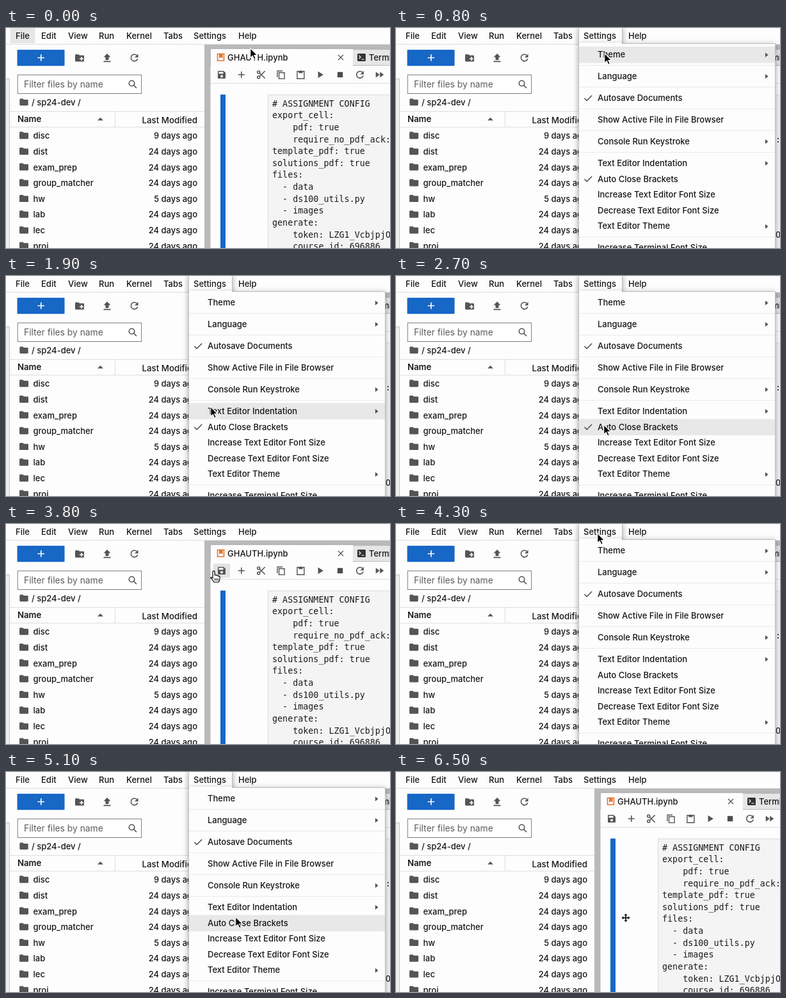
An HTML page for the animation above (6600 ms loop, 600 px wide and 344 px high).

```html
<!DOCTYPE html>
<html lang="en">
<head>
<meta charset="utf-8">
<title>Editor settings menu</title>
<style>
  html, body { margin: 0; width: 100%; height: 100%; overflow: hidden; background: #fdfdfd; }
  svg { display: block; width: 100vw; height: 100vh; }
  text { font: 500 13px Inter, "Liberation Sans", sans-serif; fill: #161616; white-space: pre; }
  .code text { font: 13.37px "DejaVu Sans Mono", monospace; fill: #1c1c1c; }
  .icon { fill: #555; stroke: none; }
  .line { fill: none; stroke: #555; stroke-width: 1.6; }
</style>
</head>
<body>
<svg viewBox="0 0 600 344" preserveAspectRatio="none">
  <defs>
    <filter id="shadow" x="-10%" y="-10%" width="120%" height="120%">
      <feDropShadow dx="0" dy="2" stdDeviation="5" flood-opacity=".36"/>
    </filter>
  </defs>
  <g id="app"></g>
  <g id="bar"></g>
  <g id="menu"></g>
  <g id="pointer"></g>
</svg>
<script>
const LOOP = 6600, STEP = 100;
const BLUE = '#1767c6', GRAY = '#b9b9b9', RULE = '#dedede', HOVER = '#e8e8e8';
const get = id => document.getElementById(id);

const rect = (x, y, w, h, fill, extra = '') =>
  `<rect x="${x}" y="${y}" width="${w}" height="${h}" fill="${fill}" ${extra}/>`;
// y is the vertical centre of the capitals
const text = (x, y, s, extra = '') => `<text x="${x}" y="${y + 4.7}" ${extra}>${s}</text>`;
const path = (d, cls = 'icon', extra = '') => `<path class="${cls}" d="${d}" ${extra}/>`;
const at = (x, y, body, scale = 1) => `<g transform="translate(${x} ${y}) scale(${scale})">${body}</g>`;

const FOLDER = 'M-7 -4.5q0-1.2 1.2-1.2h4.2l1.5 1.5h5.8q1.3 0 1.3 1.3v7.2q0 1.2-1.3 1.2h-11.5q-1.2 0-1.2-1.2z';
const icons = {
  folder: path(FOLDER),
  newFolder: path(FOLDER) + path('M3 -2v6M0 1h6', 'line', 'style="stroke:#fff"'),
  upload: path('M0 -7l5.5 5.5h-3v4.5h-5v-4.5h-3zM-5.5 4.6h11v1.7h-11z'),
  refresh: path('M3.8 -3.8A5.3 5.3 0 1 0 5.2 1.5', 'line') + path('M6 -6v5.5h-5.5z'),
  search: '<circle class="line" cx="-1.5" cy="-1.5" r="4.2"/>' + path('M1.6 1.6l4.4 4.4', 'line', 'stroke-width="2"'),
  save: path('M-6 -5q0-1 1-1h8l3 3v8q0 1-1 1h-10q-1 0-1-1z')
    + rect(-4.5, -4.5, 7, 3, '#fff') + '<circle cy="2.6" r="2" fill="#fff"/>',
  add: path('M0 -5v10M-5 0h10', 'line'),
  cut: '<circle class="line" cx="-4" cy="-4" r="2"/><circle class="line" cx="-4" cy="4" r="2"/>'
    + path('M-2.6 -2.8L6 5.8M-2.6 2.8L6 -5.8', 'line', 'stroke-width="2"'),
  copy: path('M-5.5 4v-9.7h8', 'line', 'style="stroke-width:1.4"')
    + path('M-3 -3.2h8.5v9.6h-8.5z', 'line', 'style="stroke-width:1.4"'),
  paste: path('M-5.5 -5.2h11v11.4h-11z', 'line', 'style="stroke-width:1.4"') + path('M-3.2 -5.5h2q1.2-2.6 2.4 0h2v3h-6.4z'),
  run: path('M-3.7 -5.2L4.7 0L-3.7 5.2z'),
  stop: rect(-4.2, -4.2, 8.4, 8.4, '#4c4c4c'),
  forward: path('M-6 -4.5L0 0L-6 4.5zM0.5 -4.5L6.5 0L0.5 4.5z'),
};

function fileBrowser() {
  const files = ['disc', 'dist', 'exam_prep', 'group_matcher', 'hw', 'lab', 'lec', 'proj'];
  const ages = { disc: 9, hw: 5 };
  return rect(-1, 79.5, 6.5, 270, '#eeeeee', 'stroke="#c4c4c4"')
    + rect(17.5, 34, 74, 25.3, BLUE, 'rx="1"') + path('M54.8 41.3v10.4M49.6 46.5h10.4', 'line', 'style="stroke:#fff"')
    + at(115, 47, icons.newFolder) + at(158, 47, icons.upload) + at(200.5, 46.5, icons.refresh)
    + rect(18.2, 73.3, 193.4, 29.2, '#fff', 'stroke="#7c7c7c"')
    + text(28, 88, 'Filter files by name', 'style="font-size:13.85px;font-weight:400;fill:#5c5c5c"')
    + at(198, 88, icons.search)
    + at(28, 116, icons.folder, .95) + text(40, 116, '/ sp24-dev /')
    + rect(6, 130, 304, 1, RULE) + rect(6, 154.5, 304, 1, RULE) + rect(170, 131, 1, 23, RULE)
    + text(18, 142.5, 'Name', 'style="font-size:13.2px;font-weight:600"') + path('M143 144.5l4.5-4.5l4.5 4.5z')
    + text(299, 144, 'Last Modified', 'text-anchor="end" style="font-size:13.3px"')
    + files.map((name, i) => {
      const y = 168.5 + i * 24.65;
      return at(28, y - .5, icons.folder) + text(42.5, y, name)
        + text(299, y, `${ages[name] || 24} days ago`, 'text-anchor="end"');
    }).join('');
}

function notebook() {
  const code = ['# ASSIGNMENT CONFIG', 'export_cell:', '    pdf: true', '    require_no_pdf_ack: true',
    'template_pdf: true', 'solutions_pdf: true', 'files:', '  - data', '  - ds100_utils.py',
    '  - images', 'generate:', '    token: LZG1_VcbjpjO', '    course_id: 696886'];
  const tools = ['save', 'add', 'cut', 'copy', 'paste', 'run', 'stop', 'refresh', 'forward'];
  return rect(310, 25, 290, 319, GRAY) + rect(319.5, 59, 281, 285, '#fdfdfd')
    + rect(320, 33, 222, 26, '#fdfdfd') + rect(542, 34, 58, 24, '#e6e6e6') + rect(542, 58, 58, 1, GRAY)
    + path('M330.5 40.5h10v10.5h-10z', 'line', 'style="stroke:#e8722c"')
    + path('M333 41h5.5v7l-2.75-2.4l-2.75 2.4z', 'icon', 'style="fill:#e8722c"')
    + text(346, 46, 'GHAUTH.ipynb') + path('M519 42l8 8M527 42l-8 8', 'line', 'style="stroke-width:1.2"')
    + rect(549, 40, 13, 12, '#333', 'rx="1.5"')
    + path('M551.5 43l2.5 2.5l-2.5 2.5M555.5 49h4', 'line', 'style="stroke:#fff;stroke-width:1.2"')
    + text(567, 46, 'Terminal 1')
    + '<rect id="saveHover" x="324" y="62" width="26" height="22" fill="#e2e2e2"/>'
    + tools.map((t, i) => at(337 + i * 30.85, 73, icons[t])).join('')
    + rect(320, 86, 280, 1, RULE)
    + rect(335, 104, 8, 240, BLUE, 'rx="1"')
    + rect(409.5, 104.5, 200, 250, '#f4f4f4', 'stroke="#dcdcdc"')
    + `<g class="code">${code.map((s, i) => text(416, 118 + i * 18.62, s)).join('')}</g>`;
}

const titles = [['File', 15], ['Edit', 55], ['View', 97], ['Run', 145], ['Kernel', 188],
  ['Tabs', 246], ['Settings', 293], ['Help', 363]];
const titleEdge = i => i < titles.length ? titles[i][1] - 8.5 : 401;

function menuBar(active, open) {
  let mark = '';
  if (open) mark = rect(285.5, -1, 68, 26, '#fdfdfd', 'stroke="#c2c2c2" filter="url(#shadow)"');
  else if (active >= 0) mark = rect(titleEdge(active), 0, titleEdge(active + 1) - titleEdge(active) - 1, 24, '#e6e6e6');
  return rect(0, 0, 600, 25, '#fdfdfd') + rect(0, 25, 600, 1, RULE) + mark
    + titles.map(([s, x]) => text(x, 12.5, s)).join('');
}

// label, centre, marker: '>' opens a submenu, 'v' is ticked
const rows = [['Theme', 41.5, '>'], ['Language', 75, '>'], ['Autosave Documents', 109.5, 'v'],
  ['Show Active File in File Browser', 143, ''], ['Console Run Keystroke', 177, '>'],
  ['Text Editor Indentation', 211, '>'], ['Auto Close Brackets', 236, 'auto'],
  ['Increase Text Editor Font Size', 260.3, ''], ['Decrease Text Editor Font Size', 285, ''],
  ['Text Editor Theme', 309.7, '>'], ['Increase Terminal Font Size', 343, '']];

function settingsMenu(pointerY, autoClose) {
  const near = rows.reduce((a, b) => Math.abs(b[1] - pointerY) < Math.abs(a[1] - pointerY) ? b : a);
  const hover = Math.abs(near[1] - pointerY) < 15 ? near : null;
  return rect(285.5, 24.5, 307, 340, '#fdfdfd', 'stroke="#c2c2c2" filter="url(#shadow)"')
    + rect(286, 23, 67, 3, '#fdfdfd')
    + [58, 92, 126, 160, 194, 326].map(y => rect(286, y, 306, 1, '#ebebeb')).join('')
    + (hover ? rect(286, hover[1] - 12.5, 306, 25.7, HOVER) : '')
    + rows.map(([label, y, kind]) => {
      const ticked = kind === 'v' || kind === 'auto' && autoClose;
      return text(315, y, label)
        + (kind === '>' ? path(`M577 ${y - 3}l4.6 3.6l-4.6 3.6z`) : '')
        + (ticked ? path(`M294.5 ${y + .3}l3.6 3.7l8-8`, 'line') : '');
    }).join('');
}

const pointers = {
  arrow: '<path d="M.8 .6v15l3.5-3.2l2.4 5.6l2.5-1.1l-2.4-5.4h4.8z" fill="#000" stroke="#fff" stroke-width="1.1"/>',
  hand: '<path d="M-2 1.2Q-2-.6-.4-.6T1.2 1.2V6q3-1 3.2.8q2.6-.8 2.8 1q2-.5 2 1.6q0 4-2 7.6h-7.2q-1-2.6-5.3-6.6q.6-2 3.3.2z" fill="#fff" stroke="#000" stroke-width="1.2"/>'
    + '<path d="M1.5 11v3.5M3.8 11v3.5M6 11v3.5" stroke="#000"/>',
  move: ['#fff" stroke="#fff" stroke-width="2', '#000'].map(fill =>
    `<path d="M0 -6.5l2.6 2.8H.8V-.8H3.7V-2.6L6.5 0L3.7 2.6V.8H.8V3.7H2.6L0 6.5L-2.6 3.7H-.8V.8H-3.7V2.6L-6.5 0L-3.7-2.6V-.8H-.8V-3.7H-2.6z" fill="${fill}"/>`).join(''),
};

// pointer track: time, x, y
const track = [[0, 381, 31], [300, 326, 17], [600, 322, 16], [700, 322, 16], [900, 328, 62],
  [1200, 334, 142], [1300, 335, 239], [1400, 327, 188], [1500, 311, 172], [1600, 311, 172],
  [2000, 322, 215], [2300, 330, 240], [2700, 324, 232], [3200, 324, 232], [3800, 325, 74],
  [4100, 314, 14], [4500, 313, 13], [4700, 315, 89], [4900, 335, 160], [5100, 358, 226],
  [5800, 358, 226], [5900, 357, 226], [6300, 357, 226], [6400, 359, 228], [6600, 359, 228]];

function pointerAt(t) {
  const i = track.findIndex(k => k[0] > t);
  const [a, b] = [track[i - 1], track[i]];
  const f = (t - a[0]) / (b[0] - a[0]);
  return [1, 2].map(n => Math.round(a[n] + (b[n] - a[n]) * f));
}

get('app').innerHTML = fileBrowser() + notebook();

function draw(t) {
  const [x, y] = pointerAt(t);
  const open = t >= 400 && t < 3200 || t >= 4200 && t < 6400;
  const autoClose = t < 3200;
  const overTools = !open && x >= 324 && x < 350 && y >= 62 && y < 84;
  let active = -1;
  if (t < STEP) active = 0;
  else if (y < 24) active = titles.findIndex((_, i) => x >= titleEdge(i) && x < titleEdge(i + 1));

  get('saveHover').style.display = overTools ? '' : 'none';
  get('bar').innerHTML = menuBar(active, open);
  get('menu').innerHTML = open ? settingsMenu(y, autoClose) : '';
  const shape = overTools ? 'hand' : !open && x > 343 && y > 104 ? 'move' : 'arrow';
  get('pointer').innerHTML = at(x, y, pointers[shape]);
}

let shown = -1;
function tick() {
  const t = Math.floor(performance.now() % LOOP / STEP) * STEP;
  if (t !== shown) draw(shown = t);
  requestAnimationFrame(tick);
}
tick();
</script>
</body>
</html>
```
